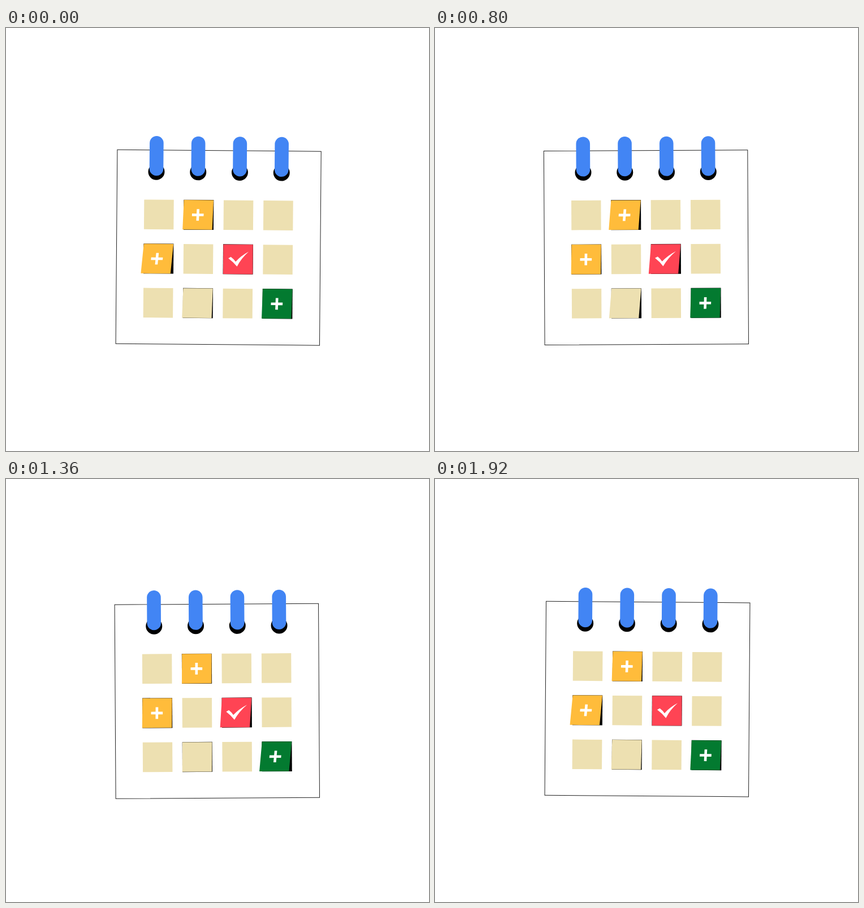
An HTML page that plays this animation: 748 by 748 pixels, repeating every 2000 ms.

```html
<!DOCTYPE html>
<html lang="en">
<head>
<meta charset="utf-8">
<title>Calendar</title>
<style>
  /* One full turn per loop; every part swings as a cosine of it. */
  @property --turn {
    syntax: "<angle>";
    inherits: true;
    initial-value: 0deg;
  }
  @keyframes loop {
    to { --turn: 360deg; }
  }
  html, body {
    margin: 0;
    width: 100%;
    height: 100%;
    overflow: hidden;
    background: #fff;
  }
  svg {
    display: block;
    width: 100%;
    height: 100%;
    animation: loop 2s steps(25) infinite;
  }
  .calendar {
    transform-origin: 374.3px 560px;
    transform:
      translateY(calc(3.45px * cos(var(--turn) - 253deg) - 2.83px))
      rotate(calc(.49deg * cos(var(--turn) - 18deg)));
  }
  /* Hinged at the top edge, the lower edge swings left. */
  .flap {
    transform: skewX(calc(-2.72deg * (1 + cos(var(--turn) - var(--peak)))));
  }
  .sheet { fill: #fff; stroke: #222; stroke-width: 1; }
  .ring { fill: #4285f4; }
  .plain { fill: #ede0b1; }
  .orange { fill: #ffbc3b; }
  .red { fill: #ff4454; }
  .green { fill: #037a30; }
  .icon { fill: #fff; }
</style>
</head>
<body>
<svg viewBox="0 0 748 748">
  <defs>
    <rect id="tile" width="52.4" height="52.4"/>
    <rect id="shade" x="-.3" y="-.3" width="53" height="53"/>
    <path id="plus" class="icon" d="M23.5 16h4.6v8h8v4.6h-8v8h-4.6v-8h-8V24h8z"/>
    <path id="check" class="icon"
      d="M9 24.5L13.5 22Q19 26 22 30.5Q31 20 45 12.5Q32 24 24.5 39Q18 31 9 24.5Z"/>
    <g id="ring">
      <circle cy="259" r="14.5"/>
      <rect class="ring" x="-12.3" y="195.8" width="24.6" height="70.2" rx="12.3"/>
    </g>
  </defs>

  <g class="calendar">
    <rect class="sheet" x="194.1" y="220.6" width="360.4" height="343"/>

    <use href="#ring" x="263.5"/>
    <use href="#ring" x="337.3"/>
    <use href="#ring" x="411"/>
    <use href="#ring" x="484.8"/>

    <g class="plain">
      <use href="#tile" x="242.3" y="308.3"/>
      <use href="#tile" x="382.9" y="308.3"/>
      <use href="#tile" x="453.3" y="308.3"/>
      <use href="#tile" x="312.6" y="386.4"/>
      <use href="#tile" x="453.3" y="386.4"/>
      <use href="#tile" x="242.3" y="464.5"/>
      <use href="#tile" x="382.9" y="464.5"/>
    </g>

    <g transform="translate(312.6 308.3)">
      <use href="#shade"/>
      <g class="flap orange" style="--peak: 101deg"><use href="#tile"/><use href="#plus"/></g>
    </g>
    <g transform="translate(242.3 386.4)">
      <use href="#shade"/>
      <g class="flap orange" style="--peak: 18deg"><use href="#tile"/><use href="#plus"/></g>
    </g>
    <g transform="translate(382.9 386.4)">
      <use href="#shade"/>
      <g class="flap red" style="--peak: 181deg"><use href="#tile"/><use href="#check"/></g>
    </g>
    <g transform="translate(312.6 464.5)">
      <use href="#shade"/>
      <g class="flap plain" style="--peak: 107deg"><use href="#tile"/></g>
    </g>
    <g transform="translate(453.3 464.5)">
      <use href="#shade"/>
      <g class="flap green" style="--peak: 250deg"><use href="#tile"/><use href="#plus"/></g>
    </g>
  </g>
</svg>
</body>
</html>
```
